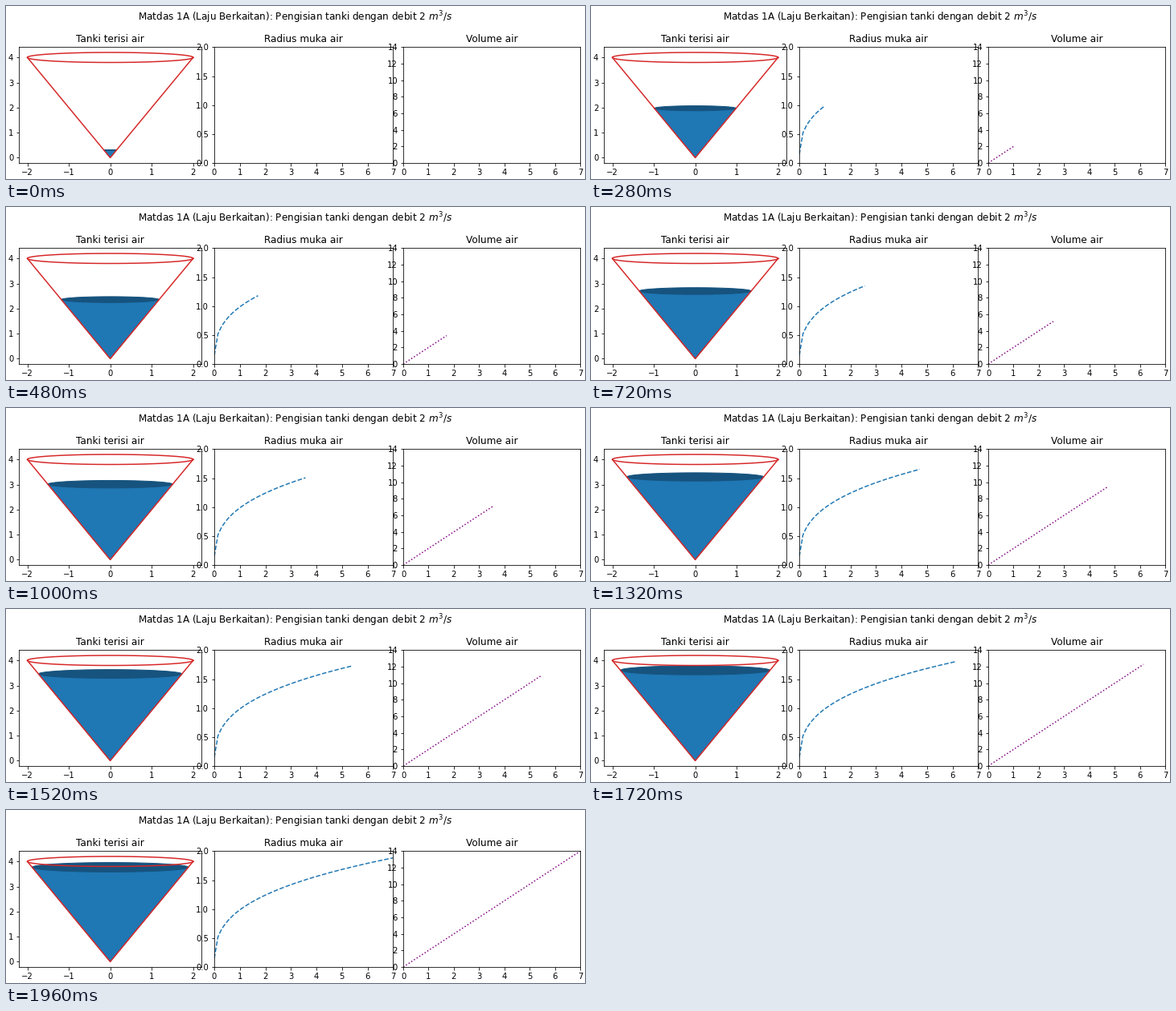
Recreate the animation shown at these times as a matplotlib script. Size 720 by 216 pixels, loop 2 s.

```python
import matplotlib.pyplot as plt
import numpy as np
from matplotlib.animation import FuncAnimation

W, H, DPI = 720, 216, 72
FRAMES, INTERVAL = 50, 40
RATE = 2          # inflow, m^3/s
HEIGHT, RADIUS = 4, 2
T_END = 7
R_START = 0.15
TILT = 0.1        # apparent flattening of horizontal circles

time = np.linspace(0, T_END, FRAMES)
volume = RATE * time
# V = pi r^2 h / 3 with h = 2 r
radius = np.cbrt(R_START**3 + 3 * volume / (2 * np.pi))
angle = np.linspace(0, 2 * np.pi, 100)


def ring(r):
    h = r * HEIGHT / RADIUS
    return np.column_stack([r * np.cos(angle), h + TILT * r * np.sin(angle)])


def wedge(r):
    h = r * HEIGHT / RADIUS
    return [(-r, h), (0, 0), (r, h)]


def add_panel(left, right, title, xlim, ylim):
    top, bottom = 51.4, 196
    ax = fig.add_axes([left / W, 1 - bottom / H, (right - left) / W, (bottom - top) / H])
    ax.set(title=title, xlim=xlim, ylim=ylim)
    return ax


fig = plt.figure(figsize=(W / DPI, H / DPI), dpi=DPI)
fig.suptitle("Matdas 1A (Laju Berkaitan): Pengisian tanki dengan debit 2 $m^3/s$")

tank = add_panel(16.2, 243, "Tanki terisi air", (-2.2, 2.2), (-0.21, 4.41))
r_plot = add_panel(259, 481.3, "Radius muka air", (0, T_END), (0, 2))
v_plot = add_panel(494, 714, "Volume air", (0, T_END), (0, RATE * T_END))

tank.plot(*ring(RADIUS).T, color="tab:red")
tank.plot(*np.transpose(wedge(RADIUS)), color="tab:red")
water = tank.fill([0], [0], color="tab:blue")[0]
surface = tank.fill([0], [0], color="#16537e")[0]
r_line, = r_plot.plot([], [], "--", color="tab:blue")
v_line, = v_plot.plot([], [], ":", color="purple")


def update(i):
    water.set_xy(wedge(radius[i]))
    surface.set_xy(ring(radius[i]))
    r_line.set_data(time[:i + 1], radius[:i + 1])
    v_line.set_data(time[:i + 1], volume[:i + 1])
    return water, surface, r_line, v_line


anim = FuncAnimation(fig, update, frames=FRAMES, interval=INTERVAL,
                     repeat=True, repeat_delay=0)
plt.show()
```
